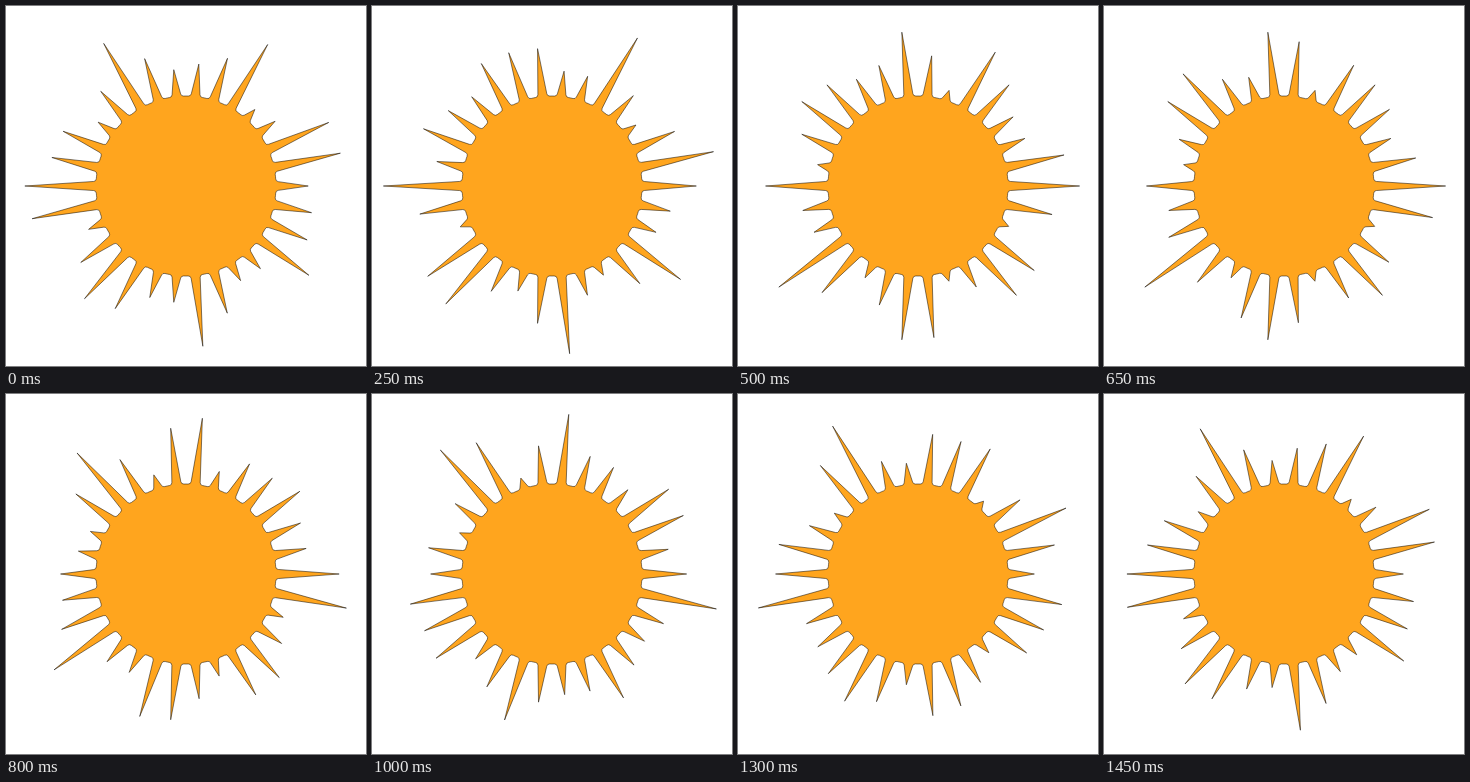
An HTML page with a canvas that plays this animation: 360 by 360 pixels, repeating every 1.5 s.

```html
<!DOCTYPE html>
<html lang="en">
<head>
<meta charset="utf-8">
<title>Sun</title>
<style>
  html, body { margin: 0; width: 100%; height: 100%; overflow: hidden; background: #fff; }
  canvas { display: block; }
</style>
</head>
<body>
<canvas id="stage" width="360" height="360"></canvas>
<script>
const ctx = document.getElementById('stage').getContext('2d');
const LOOP = 1500, STEP = 50, CENTER = 180, RADIUS = 90;
const RAD = Math.PI / 180;

// Mean tip radius of each ray, clockwise from just above the left horizontal.
const rays = [
  122, 121, 124, 143.5, 146.5, 120.5, 133.5, 138, 119.5, 147,
  117.5, 124, 139, 142, 139.5, 144.5, 118, 136.7, 127, 123,
  119, 145, 133.5, 132, 126, 136.5, 148.5, 120, 140, 145
];

const polar = (degrees, r) => [
  CENTER + r * Math.cos(degrees * RAD),
  CENTER + r * Math.sin(degrees * RAD)
];

function draw(time) {
  const phase = 2 * Math.PI * (time + 175) / LOOP;
  ctx.fillStyle = '#fff';
  ctx.fillRect(0, 0, 360, 360);

  ctx.beginPath();
  ctx.moveTo(...polar(186, RADIUS));
  rays.forEach((mean, i) => {
    const angle = 192 + 12 * i;
    const tip = polar(angle, mean * (1 + Math.cos(phase - i * Math.PI / 2) / 6));
    ctx.arcTo(...polar(angle - 3, RADIUS), ...tip, 3);
    ctx.lineTo(...tip);
    const valley = polar(angle + 6, RADIUS);
    ctx.arcTo(...polar(angle + 3, RADIUS), ...valley, 3);
    ctx.lineTo(...valley);
  });
  ctx.closePath();
  ctx.fillStyle = '#ffa51e';
  ctx.fill();
  ctx.lineWidth = 0.5;
  ctx.strokeStyle = '#000';
  ctx.stroke();
}

function frame() {
  const time = performance.now() % LOOP;
  draw(Math.floor(time / STEP) * STEP);
  requestAnimationFrame(frame);
}
frame();
</script>
</body>
</html>
```
